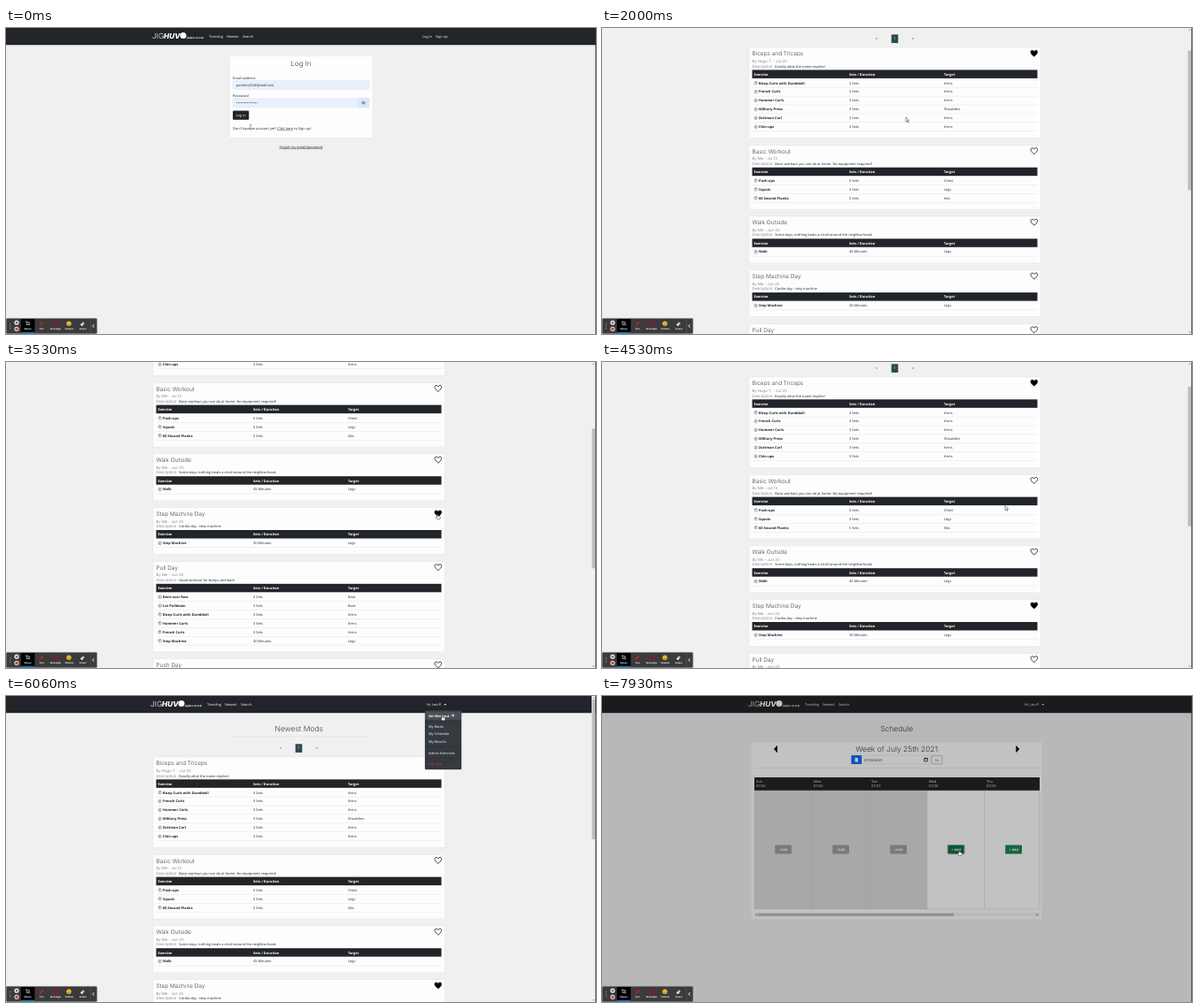
An HTML page that plays this animation: 666x346 px, repeating every 8000 ms.

```html
<!DOCTYPE html>
<html lang="en">
<head>
<meta charset="utf-8">
<title>Workout planner demo</title>
<style>
  html, body { margin: 0; width: 100%; height: 100%; overflow: hidden; background: #f0f0f0; }
  svg { display: block; width: 666px; height: 346px; }
  text { font: 3.95px "Open Sans", sans-serif; fill: #212529; white-space: pre; text-rendering: geometricPrecision; }
  .bold { font-weight: 700; }
  .white { fill: #fff; }
  .mid { text-anchor: middle; }
  .thin { font-family: Inter, sans-serif; font-weight: 300; fill: #444; }
  .title { font-size: 8.5px; }
  .head { font-size: 6.5px; }
  .meta { font-size: 4.3px; fill: #666; }
  .link { text-decoration: underline; }
  .tiny { font-size: 2.5px; }
</style>
</head>
<body>
<svg id="stage" viewBox="0 0 666 346"></svg>
<script>
const DARK = '#212529', LOOP = 8000;
const LOAD_MODS = 1000, LIKE = 3400, OPEN_MENU = 5700, LOAD_SCHEDULE = 6530, CLICK_ADD = 7600, DIM = 7860;

const text = (x, y, s, cls = '', attrs = '') => `<text x="${x}" y="${y}" class="${cls}" ${attrs}>${s}</text>`;
const rect = (x, y, w, h, fill, attrs = '') =>
  `<rect x="${x}" y="${y}" width="${w}" height="${h}" fill="${fill}" ${attrs}/>`;
const circle = (x, y, r, fill, attrs = '') => `<circle cx="${x}" cy="${y}" r="${r}" fill="${fill}" ${attrs}/>`;
const path = (d, fill = 'none', attrs = '') => `<path d="${d}" fill="${fill}" ${attrs}/>`;
const group = (id, body, attrs = '') => `<g id="${id}" ${attrs}>${body}</g>`;
const card = (x, y, w, h) => rect(x, y, w, h, '#fdfdfd', 'stroke="#e2e2e2" stroke-width=".5"');

function nav(dx, account) {
  return rect(0, 0, 666, 19.2, DARK) + `<g transform="translate(${dx})">` +
    text(165, 11.8, 'JIG', 'thin', 'style="font-size:8.5px;fill:#fff"') +
    text(178, 11.8, 'HUV', 'bold white', 'style="font:italic 800 8.3px Inter,sans-serif"') +
    circle(200, 8.4, 3.5, '#fff') +
    text(203.8, 11.8, '(alpha on 0.2)', 'bold white', 'style="font-size:2.9px"') +
    text(229, 11.3, 'Trending', 'white') + text(249, 11.3, 'Newest', 'white') +
    text(267, 11.3, 'Search', 'white') + account + '</g>';
}
const signedIn = text(477, 11.3, 'Hi, Leo P.', 'white') + path('M496.4 8.9h2.8l-1.4 1.6z', '#fff');

function loginPage() {
  return nav(0, text(470, 11.3, 'Log in', 'white') + text(485, 11.3, 'Sign up', 'white')) +
    card(252, 31.8, 162, 92.5) + text(333, 43.3, 'Log In', 'thin mid', 'style="font-size:8px"') +
    text(256, 58, 'Email address') + rect(256, 59.3, 154, 10.2, '#e8f0fe', 'rx=".8" stroke="#d5dbe5" stroke-width=".3"') +
    text(260, 65.8, 'pvorlen2046@mail.test') +
    text(256, 78, 'Password') + rect(256, 79.5, 154, 10.2, '#e8f0fe', 'rx=".8" stroke="#d5dbe5" stroke-width=".3"') +
    text(260, 86, '•'.repeat(16)) +
    rect(398, 79.5, 12, 10.2, '#dfe8f8', 'rx=".8" stroke="#cdd6e4" stroke-width=".3"') +
    path('M401.2 84.6q2.4-3 4.8 0q-2.4 3-4.8 0zM401.6 82.6l4 4', 'none', 'stroke="#3d5c9c" stroke-width=".5"') +
    circle(403.6, 84.6, .8, '#3d5c9c') +
    rect(256, 93.6, 18.2, 10.2, DARK, 'rx="1"') + text(265.1, 100.2, 'Log in', 'white mid') +
    text(256, 114.7, 'Don\'t have an account yet? <tspan class="link">Click here</tspan> to Sign up!') +
    text(333, 135.6, 'Forgot my email/password', 'mid link');
}

const sets = (n, target, ...names) => names.map(name => [name, n + ' Sets', target]);
const steps = ['Step Machine', '30 Minutes', 'Legs'];
const mods = [
  ['Biceps and Triceps', 'Hugo T. - Jul 20', 'Exactly what the name implies!', [
    ...sets(3, 'Arms', 'Bicep Curls with Dumbbell', 'French Curls', 'Hammer Curls'),
    ...sets(3, 'Shoulders', 'Military Press'), ...sets(3, 'Arms', 'Zottman Curl', 'Chin-ups')]],
  ['Basic Workout', 'Me - Jul 12', 'Basic workout you can do at home. No equipment required!', [
    ...sets(5, 'Chest', 'Push-ups'), ...sets(3, 'Legs', 'Squats'), ...sets(5, 'Abs', '60 Second Planks')]],
  ['Walk Outside', 'Me - Jun 30', 'Some days, nothing beats a stroll around the neighborhood.', [['Walk', '45 Minutes', 'Legs']]],
  ['Step Machine Day', 'Me - Jun 25', 'Cardio day - step machine', [steps]],
  ['Pull Day', 'Me - Jun 25', 'Good workout for biceps and back', [
    ...sets(3, 'Back', 'Bent-over Row', 'Lat Pulldown'),
    ...sets(3, 'Arms', 'Bicep Curls with Dumbbell', 'Hammer Curls', 'French Curls'), steps]],
  ['Push Day', 'Me - Jun 25', '', []]
];

function modCard([title, by, about, rows], index, top) {
  let out = card(166, 0, 329.5, 43 + rows.length * 9.9) +
    text(169.5, 9.4, title, 'thin head') + text(169.5, 16.9, 'By ' + by, 'thin meta') +
    text(169.5, 22.5, 'Description:', 'thin meta') + text(195.2, 22.5, about) +
    path('M487.8 10.1C482.6 6.4 483.6 3.2 485.6 3.2Q487 3.2 487.8 4.6Q488.6 3.2 490 3.2C492 3.2 493 6.4 487.8 10.1z',
      index ? 'none' : '#000', `id="heart${index}" stroke="#111" stroke-width=".8"`) +
    rect(169.5, 25.3, 322, 9.5, DARK);
  ['Exercise', 'Sets / Duration', 'Target'].forEach((s, i) => out += text([171.5, 279, 386][i], 31.7, s, 'bold white'));
  rows.forEach(([name, amount, target], i) => {
    const y = 41.5 + i * 9.9;
    out += circle(173.7, y - 1.4, 1.75, 'none', 'stroke="#333" stroke-width=".4"') +
      text(173.7, y - .4, '?', 'bold mid', 'style="font-size:2.8px"') +
      text(177, y, name, 'bold') + text(279, y, amount) + text(386, y, target) +
      rect(169.5, y + 3.4, 322, .4, '#dcdcdc');
  });
  return `<g transform="translate(0 ${top})">${out}</g>`;
}

function modsPage() {
  let top = 69, out = nav(-2, signedIn) + text(330.7, 39.7, 'Newest Mods', 'thin title mid') +
    rect(250, 45.5, 162, .4, '#d8d8d8') + text(310, 60.3, '«', 'mid') + text(351, 60.3, '»', 'mid') +
    rect(326.7, 54.3, 7.6, 9.6, '#2b4a4e') + text(330.5, 60.4, '1', 'white mid');
  mods.forEach((mod, i) => {
    out += modCard(mod, i, top);
    top += 50.9 + mod[3].length * 9.9;
  });
  return out;
}

function menu() {
  const items = [['My Mods', 36], ['My Schedule', 44.4], ['My Results', 52.7], ['Admin Exercises', 65.5]];
  return rect(473, 16, 41, 67, '#343a40', 'rx="1" stroke="#222" stroke-width=".3"') +
    rect(473.2, 17.5, 40.6, 9.3, '#495057', 'id="menuHover"') +
    text(477, 23.5, 'Set Workout', 'bold white', 'style="font-size:3.8px"') +
    path('M502.4 22h3.4M504.2 20.4l1.6 1.6-1.6 1.6', 'none', 'stroke="#fff" stroke-width=".8"') +
    items.map(([s, y]) => text(477, y, s, 'white')).join('') +
    [29.2, 57.6, 70.4].map(y => rect(473, y, 41, .4, '#23272b')).join('') +
    text(477, 78.4, 'Sign out', '', 'style="fill:#dc3545"');
}

function schedulePage() {
  let out = nav(0, signedIn) + text(332.7, 39.7, 'Schedule', 'thin title mid') +
    rect(252, 45.5, 162, .4, '#d8d8d8') + card(168, 51.8, 329.5, 201.2) +
    text(332.7, 62.8, 'Week of July 25th 2021', 'thin title mid') +
    path('M198 55.8v8.4l-4-4.2zM467.3 55.8v8.4l4-4.2z', '#000') +
    rect(293, 67.2, 77.5, 9.7, '#fff', 'stroke="#ced4da" stroke-width=".4"') +
    rect(281.3, 67, 11.8, 10, '#0d6efd', 'rx="1"') +
    path('M285.6 69.8h2.2l1.2 1.2v3.4h-3.4z', '#fff') + text(296, 73.5, '07/25/2021') +
    path('M363.8 70.3h3.6v3.6h-3.6zM363.8 70.9h3.6', 'none', 'stroke="#111" stroke-width=".7"') +
    rect(372.2, 67.3, 11.8, 9.5, '#fdfdfd', 'rx="1" stroke="#6c757d" stroke-width=".4"') +
    text(378.1, 73.5, 'Go', 'mid', 'style="fill:#6c757d"') +
    rect(172, 81, 322, .5, '#d9d6c8') + rect(172, 92, 322, 15, DARK);
  ['Sun', 'Mon', 'Tue', 'Wed', 'Thu'].forEach((day, i) => {
    const x = 172 + 65 * i, past = i < 3, wide = Math.min(65, 494 - x);
    out += rect(x, 107, wide, 134, past ? '#dcdcdc' : '#fdfdfd', 'stroke="#cfcfcf" stroke-width=".5"') +
      text(x + 2, 98.3, day, 'white', 'font-weight="600"') + text(x + 2, 103.2, `07/${25 + i}`, 'white', 'font-weight="600"') +
      rect(x + 23.2, 168.6, 18.8, 10, past ? '#9aa0a5' : '#198754', `rx="1" id="add${i}"`) +
      text(x + 32.6, 175, past ? '+Add' : '+ Add', 'white mid bold', 'style="font-size:3.8px"');
  });
  return out + rect(172, 245.2, 322, 4.2, '#f1f1f1') + rect(176, 245.7, 221, 3.2, '#bcbcbc') +
    path('M174.6 246.2v2.2l-1.3-1.1zM490.8 246.2v2.2l1.3-1.1z', '#444');
}

function toolbar() {
  const labels = ['Mouse', 'Pen', 'Rectangle', 'Stickers', 'Eraser'];
  return rect(.4, 328.4, 102.2, 17.2, '#3b3b3b', 'rx="1" stroke="#666" stroke-width=".6"') +
    rect(16.8, 329, 15.6, 15.5, '#000') + rect(16.8, 343.8, 15.6, 1.5, '#1a73b8') +
    [334.5, 337, 339.5].map(y => circle(4.7, y, .6, '#bbb')).join('') +
    circle(12, 333.2, 2.6, '#ddd') + circle(12, 333.2, 1, '#444') +
    circle(12, 340.3, 2.6, '#ddd') + circle(12, 340.3, 1.6, '#d33') +
    path('M22.6 331.8l1.2 4.2.9-1.3 1.6 1.5.7-.8-1.6-1.4 1.3-.8z', '#000', 'stroke="#fff" stroke-width=".6"') +
    path('M37.8 336.6l.5-1.6 3-3 1.2 1.1-3 3z', '#d0202a') +
    rect(53, 332.2, 5.4, 4.2, 'none', 'stroke="#a3161f" stroke-width=".9"') +
    circle(71, 334.3, 2.7, '#f4c02f') + path('M69.5 335q1.5 1.6 3 0M69.8 333.3h.6M71.6 333.3h.6', 'none', 'stroke="#543" stroke-width=".5"') +
    path('M84 335.5l3-3.2 1.8 1.6-3 3.2z', '#e7b5b5') + path('M84 335.5l1-1 1.8 1.6-1 1z', '#fff') +
    labels.map((s, i) => text(24.6 + 15.6 * i, 341.2, s, 'tiny bold white mid')).join('') +
    rect(95, 329, .4, 16, '#666') + path('M99.4 335l-1.7 2 1.7 2', 'none', 'stroke="#fff" stroke-width=".8"');
}

const pointers = {
  beam: path('M-.9-2.6h1.8M0-2.6v5.2M-.9 2.6h1.8', 'none', 'stroke="#333" stroke-width=".45"'),
  arrow: path('M0 0v5l1.2-1 .9 1.9.9-.4-.9-1.8h1.6z', '#fff', 'stroke="#111" stroke-width=".45"'),
  hand: path('M-.5 0q.5-.6 1 0v2l2.3.5q.6.2.5.9l-.5 2.4h-3L-2 3.6q.2-.8 1.5.1z', '#fff', 'stroke="#111" stroke-width=".45"')
};

const stage = document.getElementById('stage');
stage.innerHTML = rect(0, 0, 666, 346, '#f0f0f0') +
  group('login', loginPage()) + group('mods', group('content', modsPage()) + group('menu', menu()) +
    rect(661, 0, 4.5, 346, '#f1f1f1') + path('M662.2 2.6h2l-1-1.3zM662.2 343.4h2l-1 1.3z', '#555') +
    rect(661.4, 4, 3.6, 158, '#bdbdbd', 'id="thumb"')) +
  group('schedule', schedulePage()) +
  rect(0, 0, 666, 346, '#000', 'id="shade"') + rect(665.3, 0, .7, 346, '#333') + toolbar() +
  group('cursor', Object.entries(pointers).map(([id, shape]) => group(id, shape)).join(''));

const el = id => document.getElementById(id);
const show = (id, on) => el(id).setAttribute('display', on ? 'inline' : 'none');
const set = (id, name, value) => el(id).setAttribute(name, value);
const within = (t, ...spans) => spans.some(([from, to]) => t >= from && t < to);
const progress = (t, start, length) => Math.min(1, Math.max(0, (t - start) / length));
const ease = p => p * p * (3 - 2 * p);

// Each wheel notch: start time and direction.
const notches = [[1880, 1], [2070, 1], [2480, 1], [4080, -1], [4300, -1], [4620, -1]];
const scrollAt = t => 52 * notches.reduce((sum, [start, dir]) => sum + dir * ease(progress(t, start, 150)), 0);

const route = [
  [0, 276, 112], [100, 276, 112], [600, 266, 99], [1400, 300, 100], [2000, 343, 101], [2400, 343, 101],
  [3200, 487, 172], [3930, 487, 172], [4500, 455, 162.5], [4800, 455, 162.5], [5580, 485, 10],
  [5860, 485, 10], [6050, 492.5, 22], [6560, 492.5, 22], [7400, 403, 174.5], [LOOP, 403, 174.5]
];
function cursorAt(t) {
  const i = route.findIndex(point => point[0] > t);
  const [t0, x0, y0] = route[i - 1], [t1, x1, y1] = route[i];
  const p = ease((t - t0) / (t1 - t0));
  return [x0 + (x1 - x0) * p, y0 + (y1 - y0) * p];
}

function draw(t) {
  const scroll = scrollAt(t);
  show('login', t < LOAD_MODS);
  show('mods', within(t, [LOAD_MODS, LOAD_SCHEDULE]));
  show('schedule', t >= LOAD_SCHEDULE);
  show('menu', t >= OPEN_MENU && t < LOAD_SCHEDULE);
  show('menuHover', t >= 6000);
  set('content', 'transform', `translate(0 ${-scroll})`);
  set('thumb', 'y', 4 + scroll * .457);
  set('heart3', 'fill', t >= LIKE ? '#000' : 'none');
  set('add3', 'fill', t >= 7320 ? '#146c43' : '#198754');
  set('add3', 'stroke', t >= CLICK_ADD ? '#75b798' : 'none');
  set('shade', 'opacity', .5 * progress(t, DIM, 150));

  const hand = within(t, [450, LOAD_MODS], [3150, 3980], [5500, 6640], [7320, LOOP]);
  const beam = t < 450;
  show('cursor', !within(t, [LOAD_MODS, 1400]));
  show('hand', hand);
  show('beam', beam);
  show('arrow', !hand && !beam);
  set('cursor', 'transform', `translate(${cursorAt(t)})`);
}

function tick() {
  draw(performance.now() % LOOP);
  requestAnimationFrame(tick);
}
tick();
</script>
</body>
</html>
```
